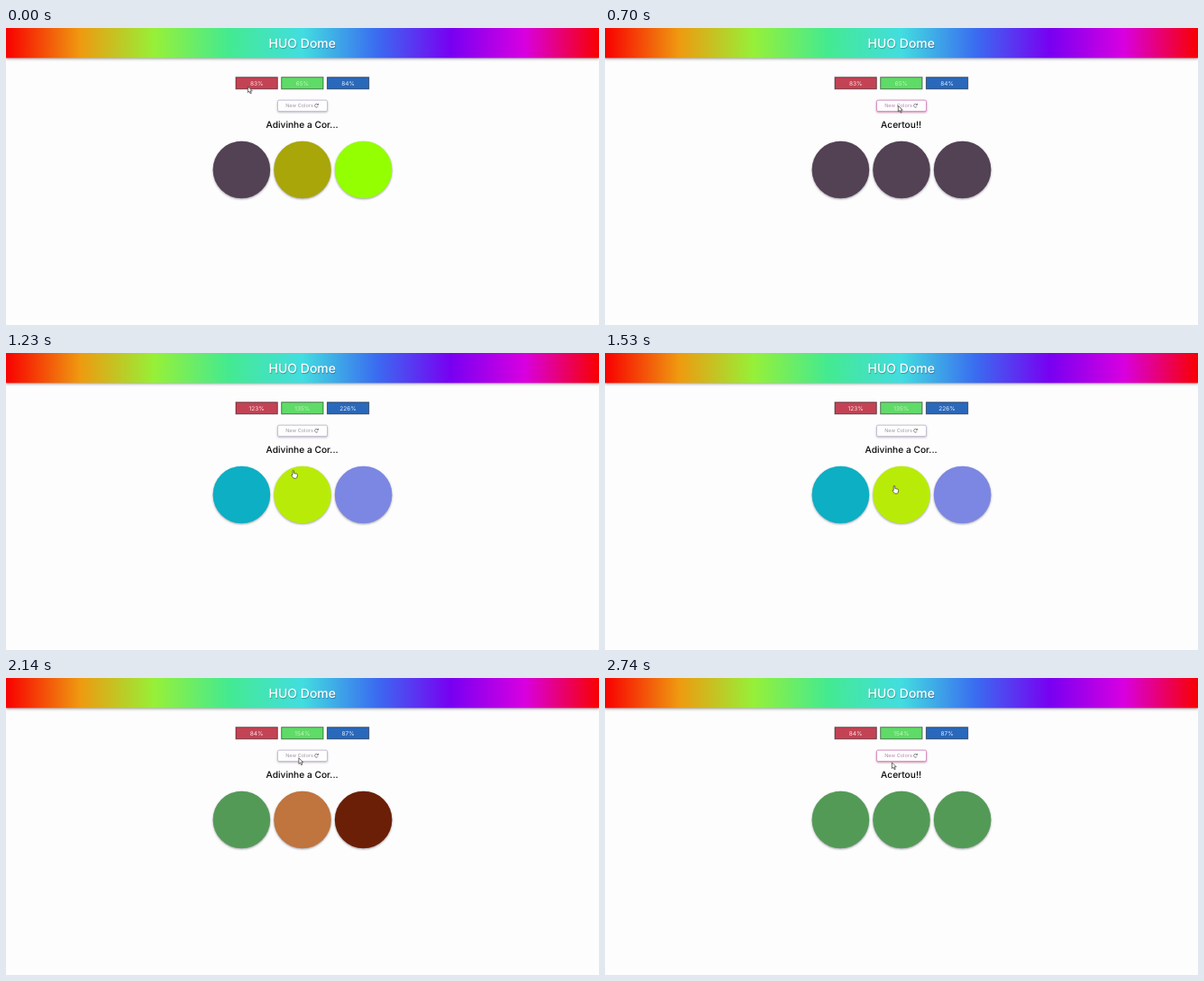
An HTML page that plays this animation: 658x330 px, repeating every 2780 ms.

```html
<!DOCTYPE html>
<html lang="pt">
<head>
<meta charset="utf-8">
<title>HUO Dome</title>
<style>
  html, body { margin: 0; width: 100%; height: 100%; overflow: hidden; background: #fdfdfd; }
  svg { display: block; width: 658px; height: 330px; }
  text { font-family: Inter, "Open Sans", sans-serif; text-anchor: middle; text-rendering: geometricPrecision; }
  #bar { filter: drop-shadow(0 1.5px 1.5px rgba(60, 55, 75, .5)); }
  #circles { filter: drop-shadow(.7px 1.6px 1.2px rgba(70, 65, 85, .5)); }
  #button { stroke: #bbb5cc; fill: #a097a5; filter: drop-shadow(.4px 1px .8px rgba(85, 75, 100, .4)); }
  #button.active { stroke: #cf82bd; fill: #b987b4; filter: drop-shadow(.4px 1px 1px rgba(165, 50, 110, .6)); }
  #button rect { fill: #fefefe; stroke-width: .8; }
  #button text { stroke: none; }
  #button path { fill: none; stroke: #5b5360; stroke-width: .7; }
</style>
</head>
<body>
<svg viewBox="0 0 658 330">
  <defs><linearGradient id="rainbow"></linearGradient></defs>
  <rect width="658" height="330" fill="#fdfdfd"/>
  <rect id="bar" width="658" height="33.3" fill="url(#rainbow)"/>
  <text x="328.8" y="21.6" font-size="14" font-weight="500" fill="#fff" style="text-shadow:.5px 1px 1px rgba(0,0,0,.3)">HUO Dome</text>
  <g id="pills"></g>
  <g id="button">
    <rect x="301.5" y="80.2" width="55" height="12.4" rx="1.6"/>
    <text x="325.5" y="88.4" font-size="5.6">New Colors</text>
    <path d="M346.2 87.1A1.9 1.9 0 1 1 345.8 84.9M346.5 83.9V85.5H344.9"/>
  </g>
  <text id="message" x="328.6" y="111" font-size="10.2" font-weight="500" fill="#090909"></text>
  <g id="circles"></g>
  <g id="cursor" fill="#fff" stroke="#333" stroke-width=".7" stroke-linejoin="round">
    <path id="arrow" d="M.3.3V7L1.9 5.6 3 8.2 4.2 7.7 3.1 5.2H5.2Z"/>
    <path id="hand" d="M-.8.8Q0-.2.8.8V3.6L4 4.2Q4.8 4.5 4.7 5.4L4 8.5Q3.8 9.2 3 9.2H.5L-2 6.2Q-2.1 5-.8 5.6Z"/>
  </g>
</svg>
<script>
const LOOP = 2780, FADE = 120, RADIUS = 31.8, CENTER_Y = 157.5;
const $ = id => document.getElementById(id);
const centerX = i => 261.4 + i * 67.6;

function add(parent, tag, attrs) {
  const node = document.createElementNS("http://www.w3.org/2000/svg", tag);
  for (const key in attrs) node.setAttribute(key, attrs[key]);
  return parent.appendChild(node);
}

// Evenly spaced stops across the header.
["#f80000", "#ef9a10", "#96f038", "#44ea90", "#42dde0", "#3a6cf0", "#7800f2", "#d800e0", "#f80000"]
  .forEach((color, i, all) => add($("rainbow"), "stop", { offset: i / (all.length - 1), "stop-color": color }));

const pills = [["#c34355", "#fbe6e2"], ["#5fdb68", "#c4f5b8"], ["#2968bb", "#e8eefa"]].map(([fill, ink], i) => {
  const x = 255 + i * 50.7;
  add($("pills"), "rect", { x, y: 54.7, width: 46.3, height: 13.1, fill });
  add($("pills"), "rect", { x, y: 54.7, width: 46.3, height: 13.1, fill: "none", stroke: "#000", "stroke-opacity": .5 });
  return add($("pills"), "text", { x: x + 23.1, y: 63.9, "font-size": 6.5, fill: ink });
});

const circles = [0, 1, 2].map(i => add($("circles"), "circle", { cx: centerX(i), cy: CENTER_Y, r: RADIUS }));

// Each round shows its colors at start; a guess turns every circle into the goal.
const rounds = [
  { start: -FADE, guess: 250, goal: 0, pick: 0, colors: [[83, 65, 84], [169, 166, 10], [148, 255, 0]] },
  { start: 720, guess: 1610, goal: 2, pick: 1, colors: [[12, 175, 195], [184, 236, 8], [123, 135, 226]] },
  { start: 1960, guess: 2470, goal: 0, pick: 0, colors: [[84, 154, 87], [192, 116, 62], [107, 31, 6]] }
];

// Places where the cursor rests.
const stops = [
  { from: 0, to: 0, x: 268, y: 64 },
  { from: 220, to: 420, x: 278, y: 137 },
  { from: 680, to: 770, x: 325, y: 86 },
  { from: 930, to: 930, x: 311, y: 71 },
  { from: 1500, to: 1640, x: 321, y: 147 },
  { from: 1900, to: 2140, x: 325, y: 88 },
  { from: 2400, to: 2500, x: 270, y: 147 },
  { from: LOOP, to: LOOP, x: 319, y: 92.5 }
];

const mix = (a, b, p) => a + (b - a) * p;
const clamp = p => Math.max(0, Math.min(1, p));
const easeOut = p => 1 - (1 - p) ** 2;
const mixColor = (a, b, p) => a.map((v, k) => mix(v, b[k], p));

function cursorAt(t) {
  const i = stops.findIndex(stop => stop.from > t);
  const a = stops[i - 1], b = stops[i];
  const p = easeOut(clamp((t - a.to) / (b.from - a.to)));
  return [mix(a.x, b.x, p), mix(a.y, b.y, p)];
}

function draw(t) {
  const index = rounds.findLastIndex(round => round.start <= t);
  const round = rounds[index], previous = rounds[Math.max(0, index - 1)];
  const goal = round.colors[round.goal], oldGoal = previous.colors[previous.goal];
  const guessed = t >= round.guess;
  const shown = easeOut(clamp((t - round.start) / FADE));
  const solved = easeOut(clamp((t - round.guess) / FADE));

  circles.forEach((circle, i) => {
    const rgb = mixColor(mixColor(oldGoal, round.colors[i], shown), goal, solved);
    circle.setAttribute("fill", `rgb(${rgb.map(Math.round)})`);
  });
  pills.forEach((label, i) => label.textContent = goal[i] + "%");
  $("message").textContent = !guessed ? "Adivinhe a Cor..." : round.pick === round.goal ? "Acertou!!" : "Errou...";
  $("button").setAttribute("class", guessed ? "active" : "");

  const [x, y] = cursorAt(t);
  const hovering = circles.some((_, i) => Math.hypot(x - centerX(i), y - CENTER_Y) < RADIUS);
  $("cursor").setAttribute("transform", `translate(${x} ${y})`);
  $("arrow").setAttribute("display", hovering ? "none" : "inline");
  $("hand").setAttribute("display", hovering ? "inline" : "none");
}

const start = performance.now();
function tick() {
  draw((performance.now() - start) % LOOP);
  requestAnimationFrame(tick);
}
tick();
</script>
</body>
</html>
```
